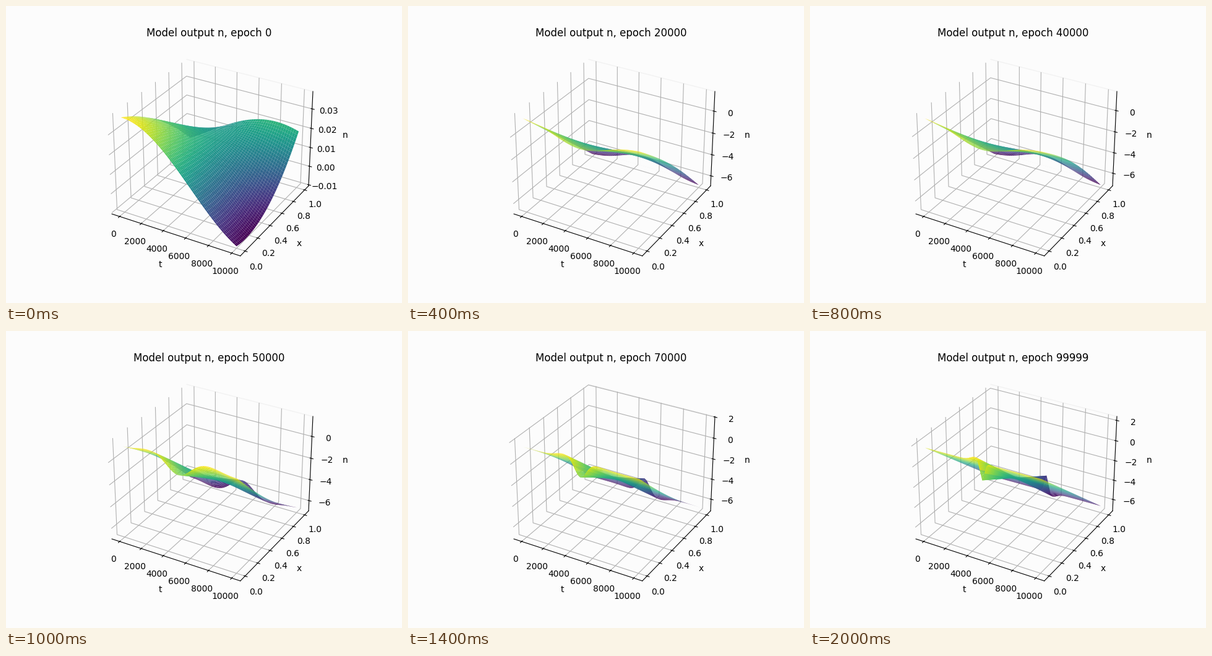
A matplotlib script that plays this animation: 640x480 px, repeating every 2.1 s.

```python
import numpy as np
import matplotlib.pyplot as plt
from matplotlib.animation import FuncAnimation

FRAMES = 21
PAPER = "#fcfcfc"
PAD = 0.05 + 1.1 / 48   # axis margin around the data

T, X = np.meshgrid(np.linspace(0, 1, 51), np.linspace(0, 1, 51))
ARCH = np.sin(np.pi * X)


def bell(s, width):
    return np.exp(-(s / width) ** 2)


def ruled(edge):
    """Surface from edge(t) at x=0 to its point mirror at x=1."""
    return edge(T) * (1 - X) + (1 - edge(1 - T)) * X


def untrained():
    """A slow wave in t whose phase turns along x."""
    w = 2.6 * T
    return (0.462 - 0.377 * X + 0.262 * X**2
            + (0.538 - 0.063 * X - 0.622 * X**2) * np.cos(w)
            + (0.14 * X + 0.124 * X**2) * np.sin(w))


def smooth_stage(i):
    """Early training: a wide, shallow sag in the middle of t."""
    dip = 0.15 + 0.002 * i
    shape = ruled(lambda t: 1 - dip * bell(t - 0.5, 0.3))
    return -6.68 - 0.07 * i, 1.76, shape + (0.03 + 0.005 * i) * T * ARCH


def sharp_stage(late):
    """Late training: the sag narrows to a notch between two shoulders."""
    off, wide = 0.25 * 0.22**late, 0.15 * 0.4**late
    dip, narrow = 0.137 + 0.06 * late, 0.13 * 0.2**late
    left, right = 0.045, 0.045 * (1 - late) ** 3
    start = 0.96 - 0.015 * late

    def edge(t):
        s = t - 0.5
        return (start + (0.965 - start) * t + left * bell(s + off, wide)
                + right * bell(s - off, wide) - dip * bell(s, narrow))

    twist = 0.12 * (1 - late) * (0.5 - T) * ARCH
    return (-7.2 + 0.21 * np.exp(-6 * late), 1.8 + 0.59 * late**0.9,
            ruled(edge) + twist)


def model(i):
    """Return z limits and the surface n(t, x) for one step."""
    if i == 0:
        lo, hi, shape = -0.0106, 0.0388, untrained()
    else:
        mix = np.clip((i - 8) / 2, 0, 1)
        late = np.clip((i - 10) / 10, 0, 1)
        lo, hi, shape = [(1 - mix) * a + mix * b for a, b in
                         zip(smooth_stage(min(i, 8)), sharp_stage(late))]
    return lo, hi, lo + (hi - lo) * (0.02 + 0.96 * shape)


fig = plt.figure(figsize=(6.4, 4.8), dpi=100, facecolor=PAPER)
ax = fig.add_subplot(projection="3d", facecolor=PAPER)
for axis in (ax.xaxis, ax.yaxis, ax.zaxis):
    axis.set_pane_color(PAPER)
ax.yaxis.pane.set_edgecolor("#f2f2f2")
ax.set_xlabel("t")
ax.set_ylabel("x")
ax.set_zlabel("n")

surface = None


def update(i):
    global surface
    if surface is not None:
        surface.remove()
    lo, hi, n = model(i)
    surface = ax.plot_surface(T * 10000, X, n, cmap="viridis",
                              rstride=1, cstride=1)
    ax.set_xlim(-PAD * 10000, (1 + PAD) * 10000)
    ax.set_ylim(-PAD, 1 + PAD)
    ax.set_zlim(lo, hi)
    ax.set_title(f"Model output n, epoch {min(5000 * i, 99999)}")
    return []


anim = FuncAnimation(fig, update, frames=FRAMES, init_func=lambda: [],
                     interval=100, repeat=True, repeat_delay=0)
plt.show()
```
